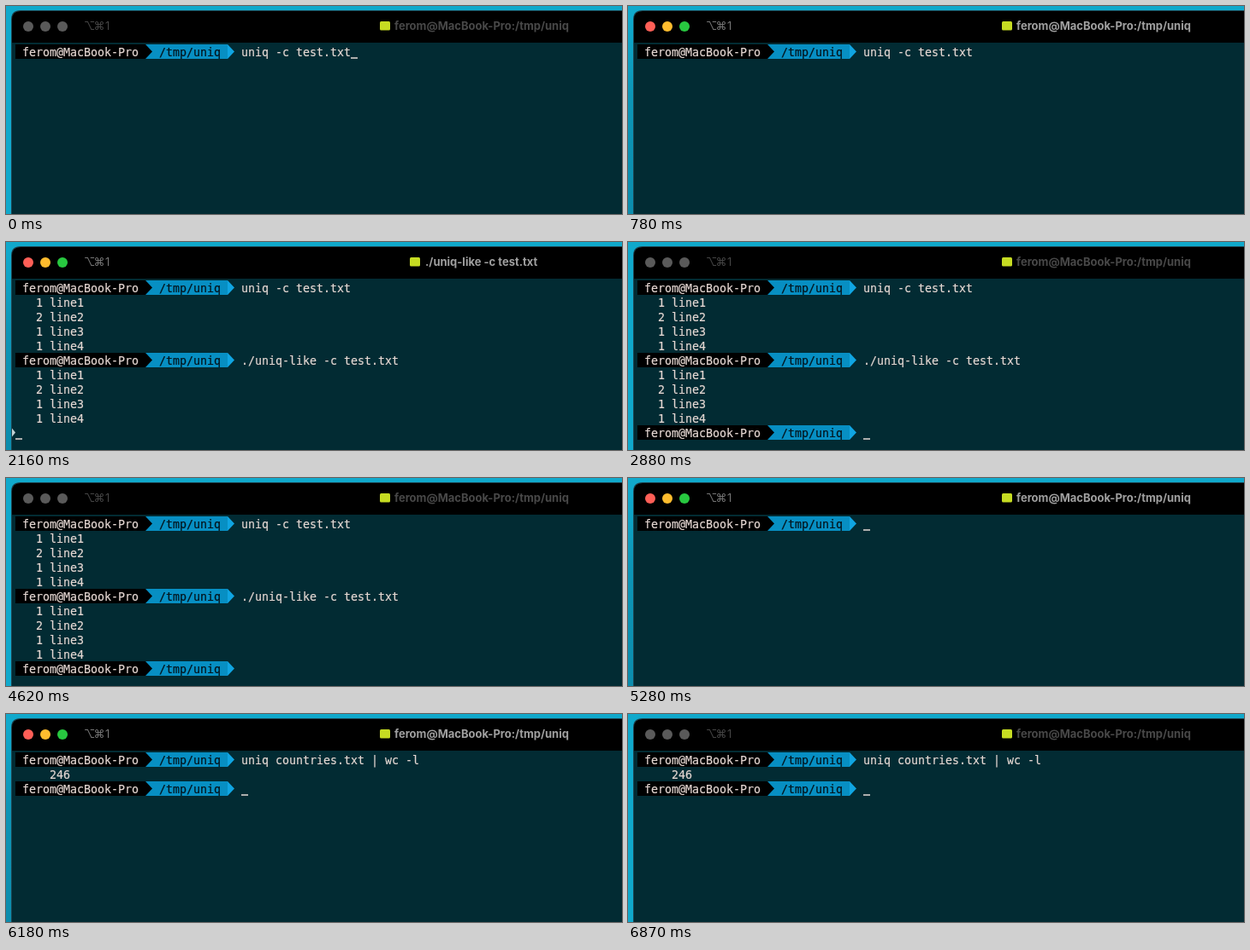
Animation of 720x244 px, one loop 8 s. Source, as an HTML page:

```html
<!DOCTYPE html>
<html lang="en">
<head>
<meta charset="utf-8">
<title>Terminal session</title>
<style>
  html, body { margin: 0; width: 100%; height: 100%; overflow: hidden; background: #10a9cc; }
  svg { display: block; width: 720px; height: 244px; }
  text { white-space: pre; }
  .mono { font: 13.29px "DejaVu Sans Mono", "Liberation Mono", monospace; fill: #e4d7d2; stroke: #e4d7d2; stroke-width: .2; }
  .path { fill: #04141c; stroke: #04141c; }
  .title { font: 700 13px Inter, "Liberation Sans", sans-serif; }
  .keys { font: 13px Inter, "DejaVu Sans", sans-serif; }
</style>
</head>
<body>
<svg id="stage" viewBox="0 0 720 244" xmlns="http://www.w3.org/2000/svg">
  <defs>
    <linearGradient id="shade" x1="0" y1="0" x2="0" y2="1">
      <stop offset="0" stop-color="#0a7d9c" stop-opacity="0"/>
      <stop offset=".4" stop-color="#0a7d9c" stop-opacity=".45"/>
      <stop offset="1" stop-color="#0a7d9c" stop-opacity=".65"/>
    </linearGradient>
  </defs>
  <rect width="720" height="244" fill="#10a9cc"/>
  <rect id="shadow" y="13" width="8" height="231" fill="url(#shade)"/>
  <path d="M6 244V16Q6 5 17 5H720V244Z" fill="#1c4450"/>
  <path d="M7 244V16Q7 6 17 6H720V244Z" fill="#000"/>
  <rect x="7" y="43" width="713" height="201" fill="#022b33"/>
  <g id="lights"></g>
  <text id="keys" class="keys" x="91 102.5 116" y="28">⌥⌘1</text>
  <rect id="icon" y="18" width="12" height="10.5" rx="1.5" fill="#c6dc22"/>
  <text id="title" class="title" y="28"></text>
  <g id="screen"></g>
</svg>
<script>
const LOOP = 8000, COL = 8, ROW = 17, LEFT = 11, TOP = 45;
const USER = "ferom@MacBook-Pro", DIR = "/tmp/uniq";
const HOME = { text: `${USER}:${DIR}`, x: 454, icon: 437 };
const RUNNING = { text: "./uniq-like -c test.txt", x: 490, icon: 472 };
const LIGHTS = ["#ff5f57", "#febc2e", "#28c840"];

// Rows that start with "$" carry a prompt.
const counts = [1, 2, 1, 1].map((n, i) => `   ${n} line${i + 1}`);
const first = ["$uniq -c test.txt"];
const listed = [...first, ...counts];
const second = [...listed, "$./uniq-like -c test.txt"];
const relisted = [...second, ...counts];
const pipe = ["$uniq countries.txt | wc -l"];
const counted = [...pipe, "     246"];
const ready = rows => [...rows, "$"];

// Each step changes only the named parts of the state.
const steps = [
  [0, { focus: false, title: HOME, rows: first, cursor: true, mark: false }],
  [330, { focus: true }],
  [780, { cursor: false }],
  [990, { rows: listed, cursor: true, mark: true }],
  [1050, { rows: ready(listed), mark: false }],
  [1710, { rows: second }],
  [2160, { rows: relisted, title: RUNNING, mark: true }],
  [2190, { rows: ready(relisted), title: HOME, mark: false }],
  [2880, { focus: false }],
  [4620, { cursor: false }],
  [4650, { focus: true }],
  [4980, { cursor: true }],
  [5280, { rows: ["$"] }],
  [5730, { rows: pipe }],
  [6120, { rows: counted, mark: true }],
  [6150, { rows: ready(counted), mark: false }],
  [6870, { focus: false }]
];

const $ = id => document.getElementById(id);
const x = col => LEFT + col * COL;
const y = row => TOP + row * ROW;

function add(parent, tag, attrs, text) {
  const el = document.createElementNS("http://www.w3.org/2000/svg", tag);
  for (const key in attrs) el.setAttribute(key, attrs[key]);
  if (text) el.textContent = text;
  parent.append(el);
  return el;
}

const write = (col, row, text, cls = "mono") =>
  add($("screen"), "text", { x: x(col), y: y(row) + 14, class: cls }, text);

const block = (col, row, width, fill) =>
  add($("screen"), "rect", { x: x(col), y: y(row), width: width * COL, height: ROW, fill });

const arrow = (col, row, fill) =>
  add($("screen"), "path", { d: `M${x(col)} ${y(row)}l8 8.5l-8 8.5z`, fill });

function drawPrompt(row) {
  block(0, row, 19, "#000");
  block(19, row, 12, "#078fc3");
  arrow(19, row, "#000");
  arrow(31, row, "#10a5e2");
  write(1, row, USER);
  write(21, row, DIR, "mono path");
}

function drawRow(line, row) {
  if (line[0] === "$") {
    drawPrompt(row);
    write(33, row, line.slice(1));
  } else {
    write(0, row, line);
  }
}

function drawCursor(rows, mark) {
  const row = mark ? rows.length : rows.length - 1;
  const col = mark ? 0 : 32 + rows[row].length;
  add($("screen"), "rect", { x: x(col), y: y(row) + 15.2, width: 8, height: 1.6, fill: "#d8d0cc" });
  if (mark) add($("screen"), "path", { d: `M7 ${y(row) + 3.5}l4 5l-4 5z`, fill: "#c3d3d5" });
}

function draw({ focus, title, rows, cursor, mark }) {
  $("shadow").setAttribute("opacity", focus ? 1 : 0);
  lights.forEach((el, i) => el.setAttribute("fill", focus ? LIGHTS[i] : "#5a5a5a"));
  $("keys").setAttribute("fill", focus ? "#747474" : "#444");
  $("title").setAttribute("fill", focus ? "#a0a0a0" : "#484848");
  $("title").setAttribute("x", title.x);
  $("title").textContent = title.text;
  $("icon").setAttribute("x", title.icon);
  $("screen").replaceChildren();
  rows.forEach(drawRow);
  if (cursor) drawCursor(rows, mark);
}

const lights = LIGHTS.map((_, i) => add($("lights"), "circle", { cx: 26 + 20 * i, cy: 24, r: 6 }));

let shown = 0;
const start = performance.now();

function tick() {
  const t = (performance.now() - start) % LOOP;
  const past = steps.filter(([at]) => at <= t);
  if (past.length !== shown) {
    shown = past.length;
    draw(Object.assign({}, ...past.map(([, change]) => change)));
  }
  requestAnimationFrame(tick);
}
tick();
</script>
</body>
</html>
```
